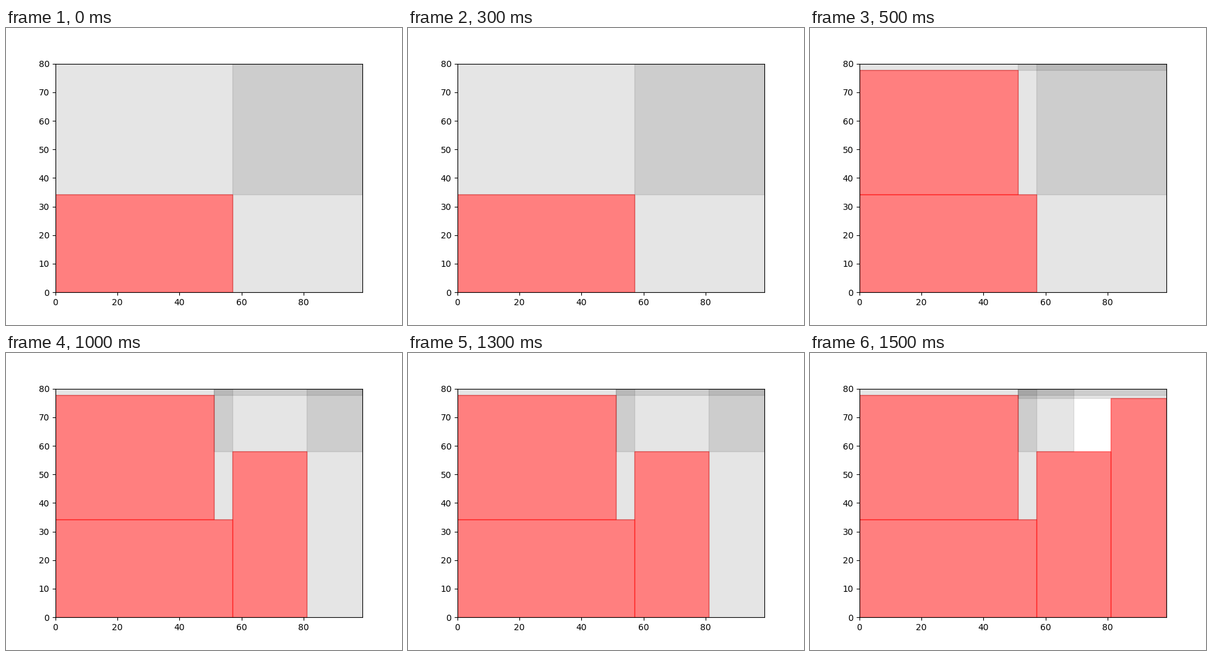
Write a matplotlib script that moves like this. It is 640 px wide and 480 px high and loops after 2000 ms.

```python
import matplotlib.pyplot as plt
from matplotlib.animation import FuncAnimation
from matplotlib.patches import Rectangle

W, H = 99, 80
LOW, MID, TALL, TOP = 34.24, 58.05, 76.67, 77.75

# Boxes as (left, bottom, right, top), one more packed at each step
PACKED = [
    (0, 0, 57, LOW),
    (0, LOW, 51, TOP),
    (57, 0, 81, MID),
    (81, 0, W, TALL),
]

# Overlapping free spaces left after each step
RIGHT = (57, 0, W, H)
STRIP = (0, TOP, W, H)
GAP = (51, LOW, 57, H)
FREE = [
    [(0, LOW, W, H), RIGHT],
    [RIGHT, STRIP, (51, LOW, W, H)],
    [STRIP, GAP, (81, 0, W, H), (51, MID, W, H)],
    [STRIP, GAP, (51, MID, 69, H), (51, TALL, W, H)],
]

fig, ax = plt.subplots(figsize=(6.4, 4.8), dpi=100)
ax.set_xlim(0, W)
ax.set_ylim(0, H)


def add_box(box, color, alpha):
    x0, y0, x1, y1 = box
    ax.add_patch(Rectangle((x0, y0), x1 - x0, y1 - y0, color=color, alpha=alpha))


def draw(step):
    for patch in list(ax.patches):
        patch.remove()
    for box in PACKED[:step + 1]:
        add_box(box, "red", 0.5)
    for box in FREE[step]:
        add_box(box, "black", 0.1)
    return ax.patches


anim = FuncAnimation(fig, draw, frames=len(PACKED), init_func=lambda: [],
                     interval=500, repeat=True, repeat_delay=0)
plt.show()
```
